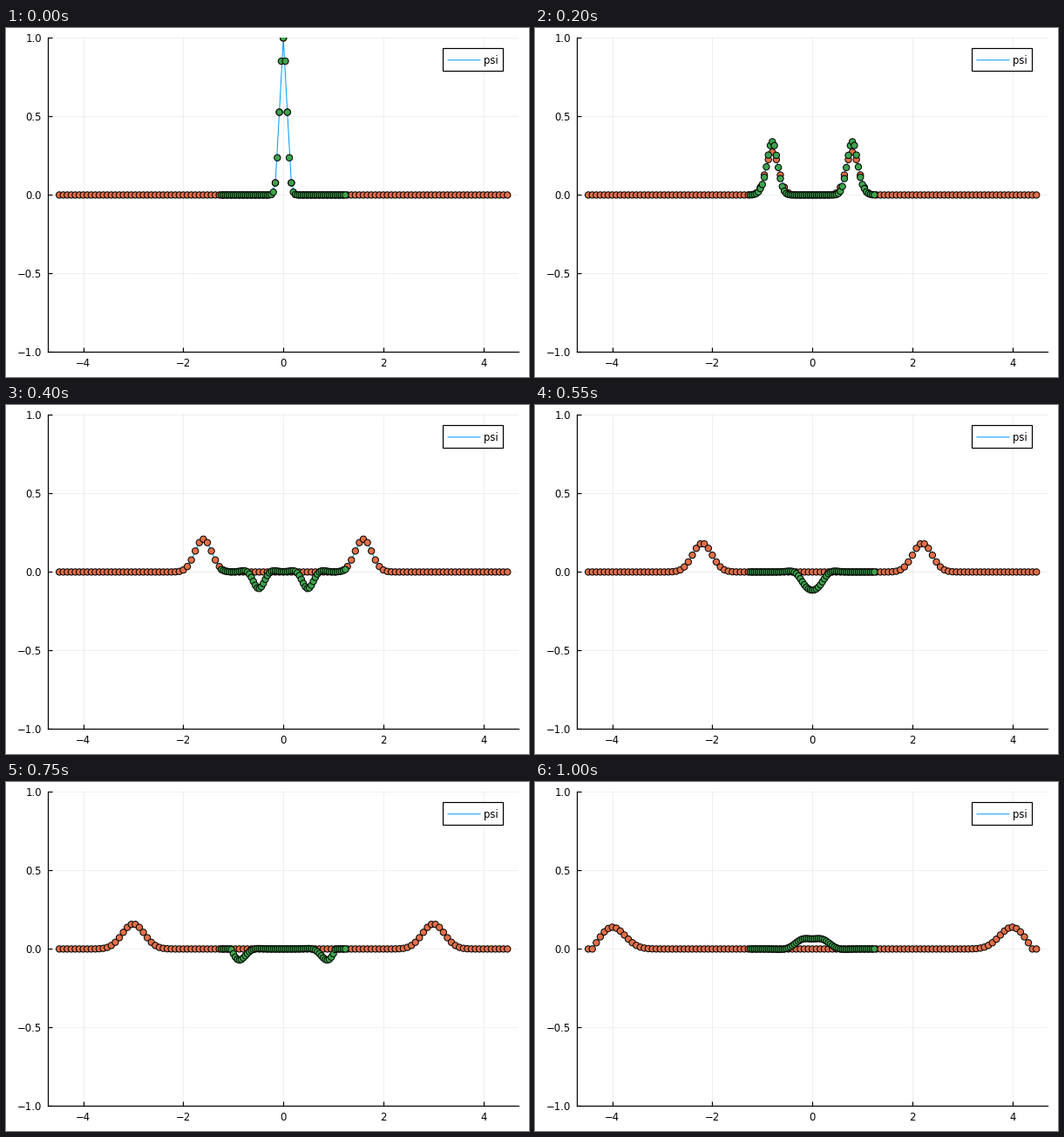
Recreate the animation shown at these times as a matplotlib script. Size 600 by 400 pixels, loop 1.05 s.

```python
import numpy as np
import matplotlib.pyplot as plt
from matplotlib.animation import FuncAnimation
from matplotlib.patches import Rectangle

W, H, DPI = 600, 400, 100
PX = 72 / DPI  # points per pixel
FRAMES, INTERVAL = 21, 50
BLUE, ORANGE, GREEN = "#009AFA", "#E36F47", "#3EA44E"

SPEED = 0.2           # pulse travel per step
VAR0 = 0.01           # initial squared width
SPREAD = 0.0059       # squared width gained per step on the coarse grid
COARSE_WALL = 4.4
FINE_WALL = 1.045
COUPLING = 0.74       # share of the coarse pulse fed into the fine grid edge

x_coarse = 0.08 * np.arange(-56, 57)
x_fine = 0.04 * np.arange(-31, 32)


def pulse(x, center, var):
    """Mirror pair of pulses, each with half of the initial area."""
    bell = lambda u: 0.05 / np.sqrt(var) * np.exp(-u**2 / var)
    return bell(x - center) + bell(x + center)


def coarse(x, n):
    p, var = SPEED * n, VAR0 + SPREAD * n
    psi = pulse(x, p, var) - pulse(x, 2 * COARSE_WALL - p, var)
    return np.where(np.abs(x) > COARSE_WALL - 0.01, 0, psi)


def fine(x, n):
    p, rate = SPEED * n, SPREAD / 2
    var = VAR0 + rate * n
    hit = FINE_WALL / SPEED
    var_edge = VAR0 + SPREAD * hit + rate * (n - hit)

    def echo(center):
        return COUPLING * pulse(x, center, var_edge) - pulse(x, center, var)

    psi = pulse(x, p, var) + echo(2 * FINE_WALL - p) - echo(4 * FINE_WALL - p)
    return np.where(np.abs(x) > FINE_WALL, COUPLING * coarse(x, n), psi)


plt.rcParams.update({"font.family": "DejaVu Sans", "font.size": 11.6 * PX})
fig = plt.figure(figsize=(W / DPI, H / DPI), dpi=DPI, facecolor="white")

left, right, top, bottom = 48.3, 588.1, 11.4, 371.4
ax = fig.add_axes([left / W, 1 - bottom / H, (right - left) / W, (bottom - top) / H])
ax.set(xlim=(-4.704, 4.704), ylim=(-1, 1),
       xticks=[-4, -2, 0, 2, 4], yticks=[-1, -0.5, 0, 0.5, 1])
ax.set_axisbelow(True)
ax.grid(color="black", alpha=0.1, lw=0.6 * PX)
ax.tick_params(direction="in", length=5 * PX, width=1.2 * PX)
ax.tick_params(axis="x", pad=6.5 * PX)
ax.tick_params(axis="y", pad=7.5 * PX)
ax.spines[["top", "right"]].set_visible(False)
ax.spines[["left", "bottom"]].set_linewidth(1.2 * PX)


def dots(x, color, z):
    # One size per dot keeps positions from being rounded to whole pixels
    sizes = np.full(x.size, (7.3 * PX) ** 2)
    return ax.scatter(x, np.zeros(x.size), s=sizes, c=color, edgecolors="black",
                      linewidths=1.0 * PX, zorder=z)


line, = ax.plot([], [], color=BLUE, lw=1.0 * PX, zorder=3)
coarse_dots = dots(x_coarse, ORANGE, 4)
fine_dots = dots(x_fine, GREEN, 5)

# Legend, laid out in pixels
key = fig.add_axes([0, 0, 1, 1])
key.set(xlim=(0, W), ylim=(H, 0))
key.axis("off")
key.add_patch(Rectangle((501.2, 23.3), 69.1, 25.9, fc="white", ec="black",
                        lw=1.2 * PX))
key.plot([507, 544], [36.8, 36.8], color=BLUE, lw=1.0 * PX, snap=False)
key.text(547.7, 36.4, "psi", va="center_baseline")


def update(n):
    psi = coarse(x_coarse, n)
    line.set_data(x_coarse, psi)
    coarse_dots.set_offsets(np.column_stack([x_coarse, psi]))
    fine_dots.set_offsets(np.column_stack([x_fine, fine(x_fine, n)]))
    return line, coarse_dots, fine_dots


anim = FuncAnimation(fig, update, frames=FRAMES, interval=INTERVAL,
                     repeat=True, repeat_delay=0)
plt.show()
```
